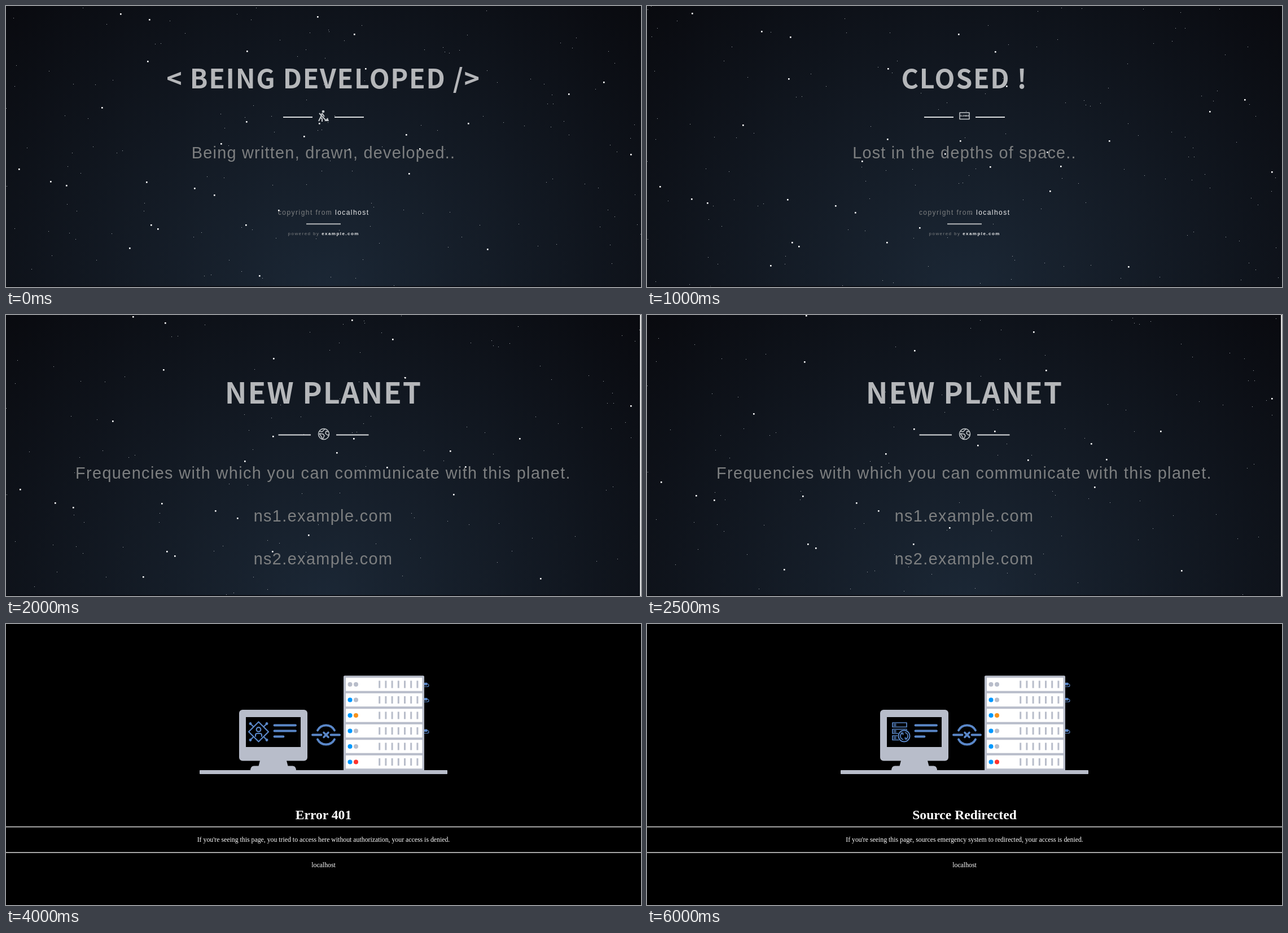
Recreate the animation shown at these times as an HTML page. Size 1125x498 px, loop 6.5 s.

```html
<!DOCTYPE html>
<html lang="en">
<head>
<meta charset="utf-8">
<title>Status pages</title>
<style>
html, body { margin: 0; height: 100%; overflow: hidden; background: #000; }
svg { display: block; width: 100vw; height: 100vh; }
text { text-anchor: middle; white-space: pre; }
.head { font-family: 'Noto Sans CJK JP', 'Noto Sans CJK SC', 'Noto Sans CJK', 'Open Sans', sans-serif; font-weight: 700; fill: #fff; fill-opacity: .69; }
.arial { font-family: 'Liberation Sans', Arial, sans-serif; }
.serif { font-family: 'Liberation Serif', 'Times New Roman', serif; fill: #fff; }
.line { fill: none; stroke: #5a87c8; stroke-linecap: round; stroke-linejoin: round; }
.icon { fill: none; stroke: #c4c8cb; stroke-width: 1.5; stroke-linejoin: round; }
</style>
</head>
<body>
<svg id="stage" viewBox="0 0 1125 498" preserveAspectRatio="none"></svg>
<script>
const GREY = '#b8bdca', BLUE = '#5a87c8', LED = '#0099ff', STEP = 500;
const bigStars = [203,14, 254,24, 552,19, 617,50, 427,80, 251,98, 637,111, 1059,135, 997,156, 170,180,
  426,205, 555,208, 819,208, 528,231, 709,228, 381,244, 608,254, 733,253, 1107,263, 23,289, 79,311,
  107,318, 249,312, 334,323, 714,297, 369,335, 483,362, 425,388, 257,388, 269,395, 219,429, 853,431,
  449,478, 80,-18];
const blobs = [95,7,9, 942,47,8, 1077,93,10, 96,73,9, 103,93,9, 290,143,10, 82,158,11, 605,178,9,
  43,214,8, 224,271,11, 276,298,9, 1035,286,9, 1120,250,7, 841,314,8, 827,354,9, 553,342,10, 164,362,8,
  108,384,8, 286,424,9, 50,440,10, 245,485,9, 491,446,8, 613,459,8, 796,408,10, 922,481,11];

let seed = 11;
const rnd = () => (seed = seed * 16807 % 2147483647) / 2147483647;
const range = n => [...Array(n).keys()];
const smallStars = range(185).flatMap(() => [rnd() * 1125 | 0, (rnd() * 630 | 0) - 100]);
const dust = range(42).map(() => [rnd() * 1125, rnd() * 498, 2 + rnd() * 5]);

const rect = (x, y, w, h, fill, r = 0) => `<rect x="${x}" y="${y}" width="${w}" height="${h}" rx="${r}" fill="${fill}"/>`;
const dot = (x, y, r, fill) => `<circle cx="${x}" cy="${y}" r="${r}" fill="${fill}"/>`;
const line = (d, w) => `<path class="line" d="${d}" stroke-width="${w}"/>`;
const text = (cls, x, y, size, gap, str, attrs = '') =>
  `<text class="${cls}" x="${x}" y="${y}" font-size="${size}" letter-spacing="${gap}" ${attrs}>${str}</text>`;
const floor = rect(0, 496.5, 1125, 1.5, '#080a10');

function stars(list, shift, zoom, size, fill) {
  let out = '';
  for (let i = 0; i < list.length; i += 2) {
    const x = Math.round(list[i] * zoom - size / 2), y = Math.round(list[i + 1] * zoom + shift - size / 2);
    if (y > -4 && y < 498) out += rect(x, y, size, size, fill);
  }
  return out;
}

const sky = (drift, zoom = 1) => `<defs><radialGradient id="sky" gradientUnits="userSpaceOnUse" cx="0" cy="0" r="1"
  gradientTransform="translate(562.5 498) scale(795.5 704.3)"><stop stop-color="#1b2735"/><stop offset="1" stop-color="#090a0f"/>
  </radialGradient></defs>` + rect(0, 0, 1125, 498, 'url(#sky)')
  + stars(smallStars, drift * 3, zoom, 1, '#a4a9ae') + stars(bigStars, drift, zoom, 2.6, '#fff') + floor;

const rules = (y, a, b) => rect(a, y - 1, b - a, 2, '#d9dcde') + rect(1125 - b, y - 1, b - a, 2, '#d9dcde');
const info = (x, y, str, gap = 1.26) => text('arial', x, y, 28.8, gap, str, 'fill="#7d7f80"');
const footer = (a, b, c) =>
  text('arial', 562.7, a, 12, 1.45, 'copyright from <tspan fill="#eee">localhost</tspan>', 'fill="#7d7f80"')
  + rect(532, b - 1, 61, 2, '#b4b7b9')
  + text('arial', 562.7, c, 8, 1.45, 'powered by <tspan fill="#eee" font-weight="700">example.com</tspan>', 'fill="#7d7f80"');

const worker = `<g class="icon">${dot(562, 187, 1.6, '#c4c8cb')}
  <path d="M560 190L557 198L554 204M557 197L560 200V205M560 190L564 196M555 190L567 203" stroke-width="2"/>
  <path d="M564 204L570 198L572 204Z" fill="#c4c8cb" stroke="none"/></g>`;
const sign = `<rect class="icon" x="554" y="189" width="17" height="11.5"/>`
  + text('arial', 562.5, 196.2, 3.6, 0, 'CLOSED', 'font-weight="700" fill="#fff"');
const hourglass = `<g class="icon" transform="translate(562.5 190)"><path d="M0 -8.3A8.3 8.3 0 1 0 3 7.7"/>
  <path d="M2 -8A8.3 8.3 0 0 1 5 6.6" stroke-dasharray="2"/>
  <path d="M-3 -5H3L-3 5H3Z" stroke-width="1.2" transform="rotate(20)"/></g>`;
const globe = `<g class="icon" transform="translate(563 211)"><circle r="9.5"/>
  <path d="M-8 -5L-3 -4L2 -9M-8 -1L-1 0L1 3L-2 9M-8 -1L-4 5L-3 8M8 -4L4 -5L3 -1L7 2L9 1"/></g>`;

const space = (drift, title, icon, desc) => sky(drift) + text('head', 562.5, 146, 46.6, 1.7, title)
  + rules(197, 491, 543) + icon + info(562.5, 270, desc) + footer(370, 386.3, 406);
const developed = drift => space(drift, '&lt; BEING DEVELOPED /&gt;', worker, 'Being written, drawn, developed..');
const closed = () => space(31.5, 'CLOSED !', sign, 'Lost in the depths of space..');

function soon() {
  let out = `<defs><radialGradient id="dark" gradientUnits="userSpaceOnUse" cx="562.5" cy="249" r="615">
    <stop stop-color="#000"/><stop offset="1" stop-color="#1a2330"/></radialGradient>
    <filter id="soft"><feGaussianBlur stdDeviation="1"/></filter></defs>` + rect(0, 0, 1125, 498, 'url(#dark)');
  const blob = (x, y, r, a) => dot(x, y, r, `rgba(150,160,168,${a})`);
  out += '<g filter="url(#soft)">';
  for (let i = 0; i < blobs.length; i += 3) {
    const [x, y, r] = blobs.slice(i, i + 3);
    out += blob(x, y, r, .08 + .13 * Math.min(1, Math.hypot(x - 562, y - 249) / 400));
  }
  out += dust.map(([x, y, r]) => blob(x, y, r, .1)).join('') + '</g>' + floor;
  return out + text('arial', 562.5, 147, 52, 1.7, 'COMING SOON', 'font-weight="700" fill="#b2b6b9"')
    + rules(191, 497.5, 544.5) + hourglass + info(562.5, 260, 'This service will be at your service soon..')
    + footer(361, 376.3, 393.7);
}

const planet = drift => sky(drift, 10 / 9) + text('head', 562.5, 156.5, 51.8, 1.9, 'NEW PLANET')
  + rules(212.5, 482.5, 540) + globe
  + info(562, 290, 'Frequencies with which you can communicate with this planet.', 1.4)
  + info(562, 365.5, 'ns1.example.com', 1.4) + info(562, 441.5, 'ns2.example.com', 1.4)
  + rect(1123.3, 0, 1.7, 498, '#fff');

const spokes = [45, 135, 225, 315].map(a => `<g transform="rotate(${a} 447.5 191)">${line('M460 191H466', 2.2)}${dot(468, 191, 2.4, BLUE)}</g>`).join('');
const badge = spokes + line('M447.5 173.5L465 191L447.5 208.5L430 191Z', 2.2)
  + `<circle class="line" cx="447.5" cy="187" r="3.8" stroke-width="2.2"/>` + line('M442 199V197Q442 194 445 194H450Q453 194 453 197V199', 2.2);
const tools = line('M435.5 205.5L455 186', 8.5) + dot(457.5, 183, 8.8, BLUE)
  + '<path d="M456 185L457 177L462 172L469 179L463 184Z" fill="#000"/>'
  + line('M435 179L444 188', 2.6) + line('M432.5 176.5L435.5 179.5', 4) + line('M455 198.5L462 206', 8);
const arrow = line('M453.5 204.5A6 6 0 0 1 452 193.5M450.5 193H453.5V196', 1.7);
const racks = [175, 186.5, 198].map(y => line(`M435 ${y}h25v7.5h-25zm2.5 2.5h3.5m-3.5 2.5h3.5`, 1.7)).join('')
  + dot(455.5, 198.5, 11.5, '#000') + `<circle class="line" cx="455.5" cy="198.5" r="10" stroke-width="1.9"/>`
  + arrow + `<g transform="rotate(180 455.5 198.5)">${arrow}</g>`;

const cut = line('M552 188.5A17 17 0 0 1 582 188.5M552 204.5A17 17 0 0 0 582 204.5M543 196.5h15.5m17 0h15.5', 3.8)
  + line('M563 192.5l8 8m0 -8l-8 8', 3.6);
const alarm = `<path d="M502.5 86L514 105H491Z" fill="${BLUE}" stroke="${BLUE}" stroke-width="9" stroke-linejoin="round"/>
  <path d="M499.8 91Q502.5 85.5 505.2 91L503.5 98.5H501.5Z" fill="#000"/>${dot(502.5, 102.5, 2.3, '#000')}`
  + line('M503 116V149M525 98.5H591', 2)
  + line('M743 254.5L745 252Q742.5 248 745.5 246.5L750 250.5Q748 254 745 252M746 246.5l-1 -2m4 4.500l1.500 -2', 1.2);

const leds = [[GREY, GREY], [LED, GREY], [LED, '#f7931e'], [LED, GREY], [LED, GREY], [LED, '#ff332e']];
const server = () => rect(598, 91.5, 143, 169, GREY, 2) + leds.map(([a, b], i) => {
  const y = 107 + i * 27.5;
  return rect(602, y - 11.7, 135.5, 23.4, '#fff') + dot(609.5, y, 4, a) + dot(620, y, 4, b)
    + range(7).map(k => rect(660.2 + k * 11.2, y - 6.5, 3, 13, GREY)).join('');
}).join('') + [107, 134, 189.5].map(y => rect(741, y - 3, 5.5, 4.5, BLUE, 1)
  + line(`M746 ${y - 1}q3 0 3 3q0 2 -3 2h-5`, 1.2)).join('');
const monitor = rect(413, 152, 121, 90.5, GREY, 6) + rect(425, 165, 97, 53, '#000')
  + `<path d="M450 242H497L499.5 251.5H508Q514 252 514 260H433Q433 252 439 251.5H447.5Z" fill="${GREY}"/>`
  + line('M475.5 179.5H513M475.5 189.5H513M475.5 199.5H491.5', 3.8);

const errorPage = (icon, link, title, note) => rect(0, 0, 1125, 498, '#000')
  + server() + monitor + rect(343, 259, 439, 7, GREY, 1) + icon + link
  + text('serif', 562.5, 346, 23.6, 0, title, 'font-weight="700"')
  + rect(0, 358.7, 1125, 1.6, '#cfcfcf') + text('serif', 562.5, 386, 11.8, 0, note)
  + rect(0, 404.2, 1125, 1.6, '#cfcfcf') + text('serif', 562.5, 431, 11.8, 0, 'localhost');
const denied = errorPage(badge, cut, 'Error 401',
  "If you're seeing this page, you tried to access here without authorization, your access is denied.");
const repair = errorPage(tools, alarm, 'Maintenance Mode',
  "If you're seeing this page, something is broken or some innovation is going on, usually it doesn't take long, your access is denied.");
const moved = errorPage(racks, cut, 'Source Redirected',
  "If you're seeing this page, sources emergency system to redirected, your access is denied.");

const slides = [developed(0), developed(15.8), closed(), soon(), planet(-12), planet(-25.2),
  denied, denied, denied, repair, repair, moved, moved];
const stage = document.getElementById('stage');
const start = performance.now();
let shown = -1;

function draw(now) {
  const i = Math.floor(Math.max(0, now - start) / STEP) % slides.length;
  if (i !== shown) stage.innerHTML = slides[shown = i];
  requestAnimationFrame(draw);
}
draw(start);
</script>
</body>
</html>
```
